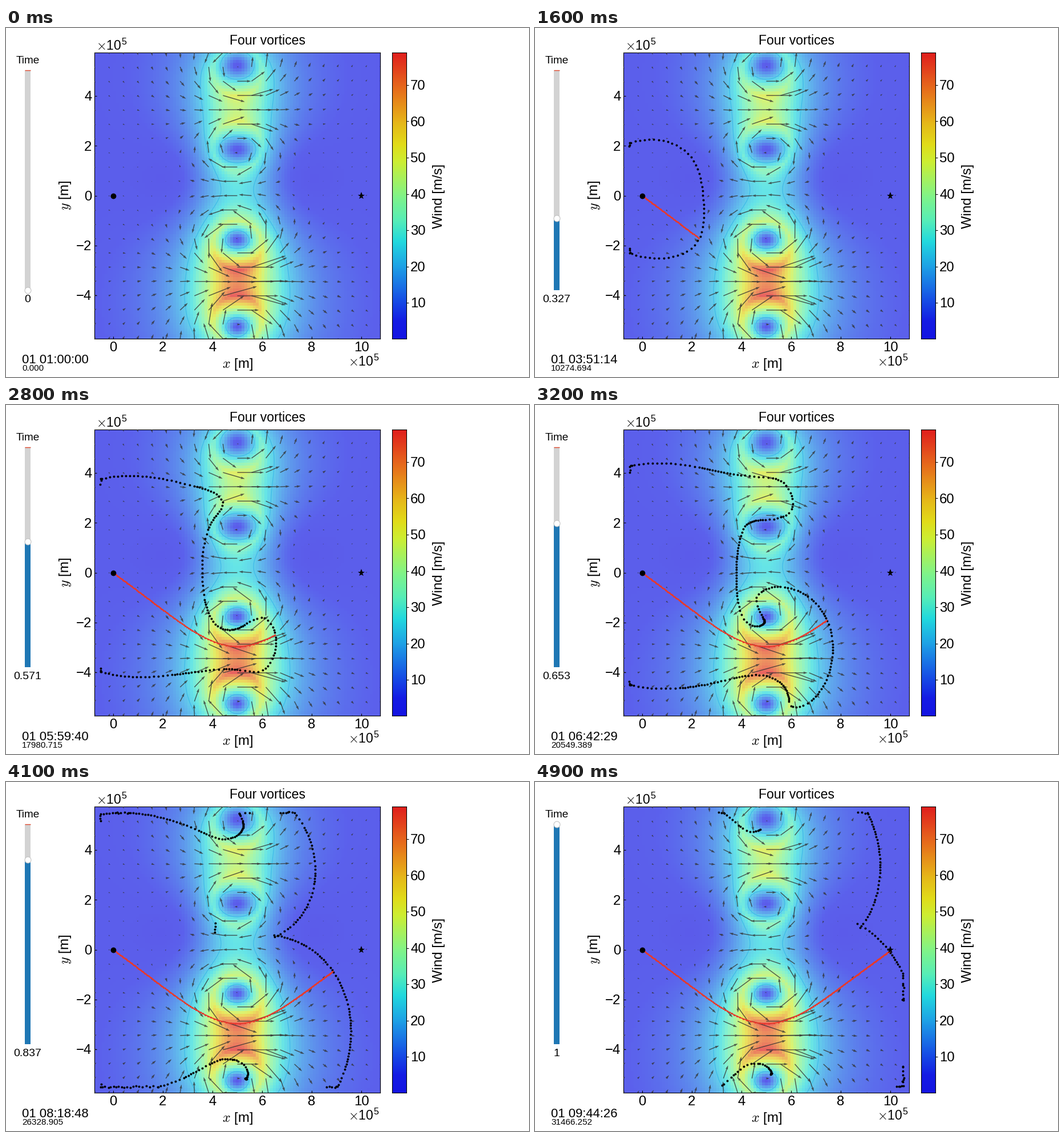
A matplotlib script for the animation above (5000 ms loop, 917 by 611 pixels).

```python
import numpy as np
import matplotlib.pyplot as plt
from matplotlib.animation import FuncAnimation
from matplotlib.colors import LinearSegmentedColormap, Normalize
from matplotlib.patches import Rectangle

W, H, DPI = 917, 611, 100
PT = 72 / DPI
FRAMES, INTERVAL = 50, 100
T_END = 31466.2518

AIRSPEED = 23.0
SCALE = 1e6
TARGET = SCALE + 0j
CORE = 0.1 * SCALE
CENTERS = SCALE * np.array([0.5 + 0.5j, 0.5 + 0.2j, 0.5 - 0.2j, 0.5 - 0.5j])
CIRCULATION = SCALE * AIRSPEED / (2 * np.pi) * np.array([1, -1, 1.5, -1.5])

SUBSTEPS = 10
DT = T_END / (FRAMES - 1) / SUBSTEPS
HALF_DOMAIN = 0.55e6
HALF_GRID = 0.58e6
CELL = 4e3
AHEAD = 8e3       # look-ahead used to detect overtaken extremals
LATE = 1100       # delay after which an extremal counts as overtaken
LINGER = 1300     # how long a dot stays after leaving the domain
RAY_GAP = 3e3     # largest gap between computed extremals
DOT_GAP = 2.05e4  # largest gap between drawn dots
EDGE_GAP = 1e4    # the same where the front leaves the domain
COARSE, FINE = 40, 128

plt.rcParams.update({"font.family": "Liberation Sans", "mathtext.fontset": "cm"})


def vortex_terms(z):
    d = z[..., None] - CENTERS
    r2 = np.maximum(np.abs(d) ** 2, 1.0)
    return d, r2, 1j * CIRCULATION / np.maximum(r2, CORE ** 2)


def wind(z):
    d, _, k = vortex_terms(z)
    return (k * d).sum(-1)


def rates(z, p):
    """Zermelo extremals: velocity and adjoint rate in complex form."""
    d, r2, k = vortex_terms(z)
    q = p[..., None]
    turn = np.where(r2 < CORE ** 2, k * q, k * d * d / r2 * np.conj(q))
    return (k * d).sum(-1) + AIRSPEED * p / np.abs(p), turn.sum(-1)


def step(z, p):
    dz, dp = rates(z, p)
    dz, dp = rates(z + dz * DT / 2, p + dp * DT / 2)
    return z + dz * DT, p + dp * DT


def shoot(angles):
    z, p = np.zeros(len(angles), complex), np.exp(1j * angles)
    path = [z]
    for _ in range((FRAMES - 1) * SUBSTEPS):
        z, p = step(z, p)
        path.append(z)
    return np.array(path)


def best_path():
    lo, hi = np.radians([-50, -25])
    for _ in range(2):
        angles = np.linspace(lo, hi, 301)
        paths = shoot(angles)
        best = np.argmin(np.abs(paths[-1] - TARGET))
        width = angles[1] - angles[0]
        lo, hi = angles[best] - width, angles[best] + width
    return paths[:, best]


class Front:
    """Wavefront made of many extremals, some of which are drawn as dots."""

    def __init__(self):
        n = COARSE * FINE
        self.z = np.zeros(n, complex)
        self.p = -np.exp(2j * np.pi * np.arange(n) / n)
        self.alive = np.ones(n, bool)
        self.drawn = np.arange(n) % FINE == 0
        self.left_at = np.full(n, -np.inf)
        cells = int(2 * HALF_GRID / CELL) + 1
        self.reached = np.full((cells, cells), np.inf)
        self.rng = np.random.default_rng(1)

    def cell(self, z):
        x = (z.real - SCALE / 2 + HALF_GRID) / CELL
        y = (z.imag + HALF_GRID) / CELL
        return x.astype(int), y.astype(int)

    def advance(self, t):
        live = np.flatnonzero(self.alive)
        z, p = step(self.z[live], self.p[live])
        p /= np.abs(p)
        out = np.maximum(np.abs(z.real - SCALE / 2), np.abs(z.imag)) > HALF_DOMAIN
        jitter = self.rng.uniform(-3e3, 3e3, (2, out.sum()))
        z[out] += jitter[0] + 1j * jitter[1]
        self.z[live], self.p[live] = z, p
        self.left_at[live[out]] = t
        self.alive[live[out]] = False

        here = self.cell(z[~out])
        self.reached[here] = np.minimum(self.reached[here], t)
        ahead = self.cell(z[~out] + AHEAD * p[~out])
        self.alive[live[~out][t - self.reached[ahead] > LATE]] = False

    def densify(self):
        z, p, alive = self.z, self.p, self.alive
        i = np.flatnonzero(alive[:-1] & alive[1:] & (np.abs(np.diff(z)) > RAY_GAP))
        self.z = np.insert(z, i + 1, (z[i] + z[i + 1]) / 2)
        self.p = np.insert(p, i + 1, (p[i] + p[i + 1]) / 2)
        self.alive = np.insert(alive, i + 1, True)
        self.drawn = np.insert(self.drawn, i + 1, False)
        self.left_at = np.insert(self.left_at, i + 1, -np.inf)

    def visible(self, t):
        return self.alive | (self.left_at > t - LINGER)

    def add_dots(self, t):
        """Draw the middle extremal between dots that have drifted apart."""
        shown, alive = self.visible(t), self.alive
        a = np.flatnonzero(self.drawn)
        b = np.roll(a, -1)
        span = (b - a) % len(alive)
        limit = np.where(alive[a] & alive[b], DOT_GAP, EDGE_GAP)
        wide = (np.abs(self.z[a] - self.z[b]) > limit) & (span > 1)
        wide &= shown[a] & shown[b] & (alive[a] | alive[b])
        self.drawn[(a + span // 2)[wide] % len(alive)] = True

    def dots(self, t):
        return self.z[self.drawn & self.visible(t)]


def wavefronts():
    front = Front()
    shots = [front.z[:0]]
    for i in range(1, (FRAMES - 1) * SUBSTEPS + 1):
        front.advance(i * DT)
        if i % SUBSTEPS == 0:
            front.densify()
            for _ in range(3):
                front.add_dots(i * DT)
            shots.append(front.dots(i * DT))
    return shots


def slider_text(v):
    for digits in range(4):
        if abs(v - round(v, digits)) < 1e-3:
            break
    return f"{v:.{digits}f}"


def clock_text(t):
    s = int(t) + 3600
    return f"01 {s // 3600:02d}:{s // 60 % 60:02d}:{s % 60:02d}"


fig = plt.figure(figsize=(W / DPI, H / DPI), dpi=DPI, facecolor="white")


def px_axes(x, y, w, h):
    return fig.add_axes([x / W, 1 - (y + h) / H, w / W, h / H])


def label(x, y, text, size, ha="left", va="baseline", **kw):
    return fig.text(x / W, 1 - y / H, text, fontsize=size * PT, ha=ha, va=va, **kw)


stops = [(0, (20, 20, 226)), (0.06, (20, 28, 228)), (0.125, (22, 72, 229)),
         (0.25, (30, 160, 230)), (0.34, (34, 217, 222)), (0.41, (85, 237, 185)),
         (0.5, (130, 244, 135)), (0.62, (205, 238, 50)), (0.68, (225, 220, 25)),
         (0.76, (230, 180, 25)), (0.88, (230, 105, 28)), (1, (224, 30, 28))]
cmap = LinearSegmentedColormap.from_list(
    "wind", [(s, tuple(c / 255 for c in rgb)) for s, rgb in stops], N=512)

# Wind map
HALF = 0.575e6
nodes = np.linspace(-HALF, HALF, 101)
gx, gy = np.meshgrid(nodes + SCALE / 2, nodes)
field = wind(gx + 1j * gy)
speed = np.abs(field)
norm = Normalize(speed.min(), speed.max())
edge = HALF + HALF / 100

ax = px_axes(155, 43, 501, 501)
ax.imshow(speed, origin="lower", cmap=cmap, norm=norm, alpha=0.7, aspect="auto",
          interpolation="nearest", zorder=0,
          extent=(SCALE / 2 - edge, SCALE / 2 + edge, -edge, edge))
ax.contour(gx, gy, speed, levels=[AIRSPEED], colors=["#3cbbe8"], linewidths=0.8)
sub = (slice(None, None, 5),) * 2
ax.quiver(gx[sub], gy[sub], field[sub].real, field[sub].imag,
          color=(0.2, 0.2, 0.2), alpha=0.8, minlength=0.1, zorder=3)
ax.set(xlim=(SCALE / 2 - HALF, SCALE / 2 + HALF), ylim=(-HALF, HALF),
       xticks=np.arange(0, 11, 2) * 1e5, yticks=np.arange(-4, 5, 2) * 1e5)
ax.tick_params(direction="in", labelbottom=False, labelleft=False, length=3)

# Colour bar
bar = px_axes(676.5, 43, 25.5, 501)
bar.imshow(np.linspace(0, 1, 512)[:, None], origin="lower", cmap=cmap, aspect="auto",
           extent=(0, 1, norm.vmin, norm.vmax))
bar.set(xticks=[], yticks=range(10, 71, 10))
bar.yaxis.tick_right()
bar.tick_params(labelright=False, length=3)

# Labels
for i in range(0, 11, 2):
    label(187.6 + 43.56 * i, 566, str(i), 24, "center")
for i in range(-4, 5, 2):
    label(150.5, 301.7 - 43.56 * i, str(i).replace("-", "\u2212"), 24, "right")
for v in range(10, 71, 10):
    y = 544 - 501 * (v - norm.vmin) / (norm.vmax - norm.vmin)
    label(709, y + 8.3, str(v), 24)
power = r"$\times\mathregular{10}^{\mathregular{5}}$"
label(158, 39, power, 23)
label(655, 592, power, 23, "right")
label(458, 29, "Four vortices", 23, "center")
label(405.5, 595, "$x$ [m]", 24, "center")
label(104, 293.5, "$y$ [m]", 24, "center", "center", rotation=90)
label(759, 294, "Wind [m/s]", 24, "center", "center", rotation=90)
label(38, 62, "Time", 19, "center")
value = label(38, 480, "", 19.5, "center")
clock = label(28, 587, "", 22.2)
seconds = label(28, 600, "", 15.2)

# Slider
TOP, BOTTOM = 73.5, 458.5
panel = fig.add_axes([0, 0, 1, 1])
panel.set(xlim=(0, W), ylim=(H, 0))
panel.axis("off")
panel.add_patch(Rectangle((33, TOP), 10, BOTTOM - TOP, fc="lightgray", ec="none"))
fill = panel.add_patch(Rectangle((33, BOTTOM), 10, 0, fc="#1f77b4", ec="none"))
panel.plot([33, 43], [TOP, TOP], color="#e0492e", lw=1.4 * PT,
           solid_capstyle="butt")
handle, = panel.plot([38.3], [BOTTOM], "o", ms=11 * PT, mfc="white", mec="0.75",
                     mew=1 * PT)

# Moving parts and end points
dots, = ax.plot([], [], "o", color="black", ms=3.9 * PT, mew=0, zorder=5)
route, = ax.plot([], [], "-o", color="#e8392b", lw=1.9 * PT, ms=3 * PT, mew=0,
                 markevery=3, zorder=6)
ax.plot(0, 0, "o", color="black", ms=9.8 * PT, mew=0, zorder=7)
ax.plot(TARGET.real, 0, "*", color="black", ms=13.5 * PT, mew=0, zorder=7)

fronts = wavefronts()
path = best_path()


def update(frame):
    v = frame / (FRAMES - 1)
    t = v * T_END
    y = BOTTOM + (TOP - BOTTOM) * v
    fill.set_bounds(33, y, 10, BOTTOM - y)
    handle.set_ydata([y])
    value.set_text(slider_text(v))
    clock.set_text(clock_text(t))
    seconds.set_text(f"{t:.3f}")
    dots.set_data(fronts[frame].real, fronts[frame].imag)
    trail = path[:frame * SUBSTEPS + 1]
    route.set_data(trail.real, trail.imag)
    return fill, handle, value, clock, seconds, dots, route


anim = FuncAnimation(fig, update, frames=FRAMES, interval=INTERVAL,
                     repeat=True, repeat_delay=0)
plt.show()
```
